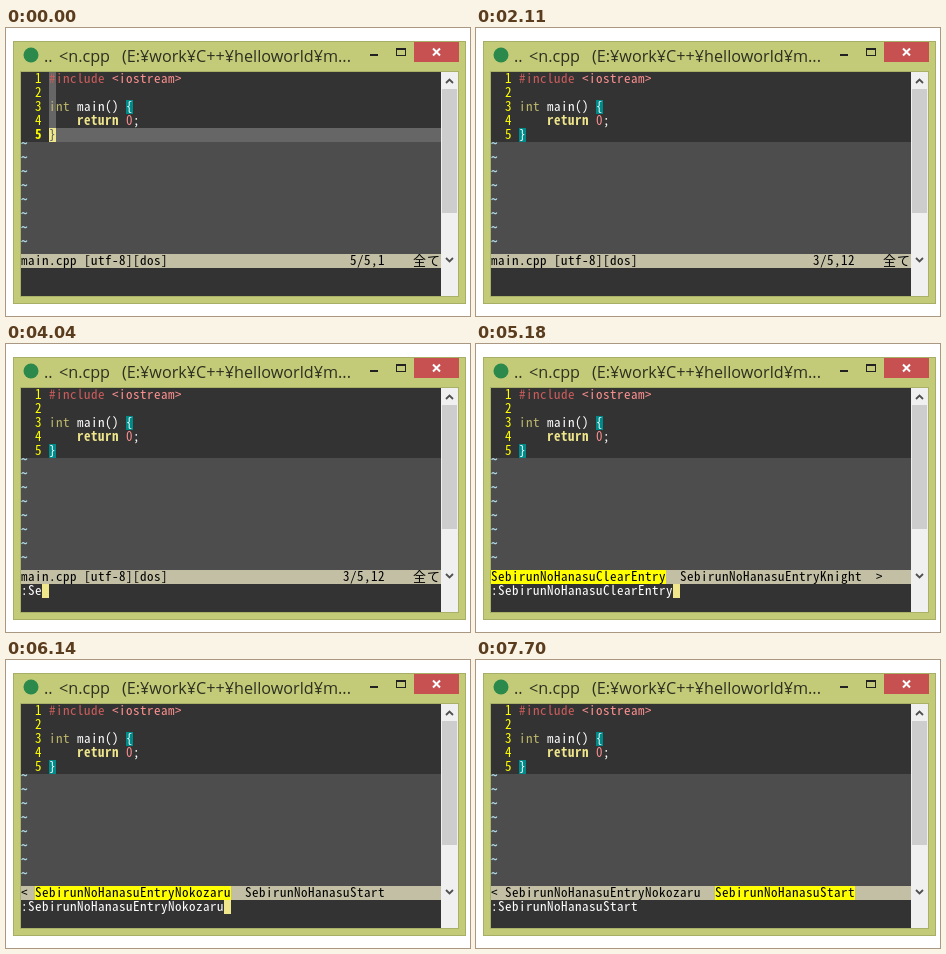
Animation, 464 px wide and 288 px high, one loop 8 s. Source, as an HTML page:

```html
<!DOCTYPE html>
<html lang="ja">
<head>
<meta charset="utf-8">
<title>Editor command completion</title>
<style>
html, body { margin: 0; width: 464px; height: 288px; overflow: hidden; background: #fff; }
svg { display: block; }
.term text {
  font: 13px "Noto Sans Mono CJK JP", "Noto Sans Mono CJK", "Noto Sans CJK JP", "Noto Sans CJK", "Liberation Mono", monospace;
  white-space: pre;
}
.term .bold { font-weight: 700; }
.title text { font: 16.2px "Open Sans", "Noto Sans", sans-serif; fill: #2e3020; white-space: pre; }
</style>
</head>
<body>
<svg width="464" height="288" viewBox="0 0 464 288">
  <g shape-rendering="crispEdges">
    <rect x="7" y="13" width="453" height="263" fill="#a7ae66"/>
    <rect x="8" y="14" width="451" height="261" fill="#c3cb79"/>
    <rect x="14" y="43" width="439" height="226" fill="#a9b168"/>
    <rect x="15" y="44" width="437" height="224" fill="#f0f0f0"/>
    <rect x="436" y="61" width="15" height="124" fill="#cdcdcd"/>
    <rect x="408" y="14" width="45" height="20" fill="#c75050"/>
    <rect x="364" y="26" width="8" height="2" fill="#222"/>
    <path d="M390 20h10v8h-10zM391 22v5h8v-5z" fill="#222" fill-rule="evenodd"/>
  </g>
  <path d="M427 20.5l7 7m0-7l-7 7" stroke="#fff" stroke-width="2"/>
  <path d="M440 55l3.5-3.5 3.5 3.5M440 230l3.5 3.5 3.5-3.5" fill="none" stroke="#505050" stroke-width="1.8"/>
  <circle cx="25" cy="27" r="7.5" fill="#2b8a4b"/>
  <g class="title">
    <text x="38" y="34">..</text>
    <text x="53" y="34">&lt;n.cpp</text>
    <text x="116" y="34">(E:¥work¥C++¥helloworld¥m...</text>
  </g>
  <g class="term">
    <g shape-rendering="crispEdges">
      <rect x="15" y="44" width="420" height="224" fill="#333"/>
      <rect x="15" y="114" width="420" height="112" fill="#4d4d4d"/>
      <rect x="15" y="226" width="420" height="14" fill="#c2bfa5"/>
    </g>
    <g id="under"></g>
    <g id="code"></g>
    <g id="over"></g>
  </g>
</svg>
<script>
const LOOP = 8000, CW = 7, LH = 14, LEFT = 15, TOP = 44, BASELINE = 11;
const STATUS = 13, CMD = 14, LAST = 15;
const WHITE = '#fff', YELLOW = '#ff0', KHAKI = '#f0e68c', PINK = '#ff9090', TEAL = '#008b8b', LINE = '#666';

const base = 'SebirunNoHanasu';
const items = ['ClearEntry', 'EntryKnight', 'EntryNokozaru', 'Start'].map(s => base + s);

const jump = 1390, colonShown = 2680, cmdStart = 3640;
const blinks = [400, 680, 1080, jump, 2110, 2420, 3360, cmdStart, 6760, 7020, 7700];
const keys = [cmdStart, 3760, 4040, 4350, 4350, 4500, 4500, 4900];
const picks = [5180, 5740, 6140, 7020];

const [under, code, over] = ['under', 'code', 'over'].map(id => document.getElementById(id));
const passed = (times, t) => times.filter(x => x <= t).length;

function add(parent, tag, attrs) {
  const el = document.createElementNS('http://www.w3.org/2000/svg', tag);
  for (const k in attrs) el.setAttribute(k, attrs[k]);
  return parent.appendChild(el);
}

function box(parent, row, col, cols, fill, rows = 1) {
  add(parent, 'rect', {
    x: LEFT + col * CW, y: TOP + row * LH, width: cols * CW, height: rows * LH,
    fill, 'shape-rendering': 'crispEdges'
  });
}

// Each character sits on its own terminal cell.
function put(parent, row, col, str, fill, { bold = false, step = 1, dy = 0 } = {}) {
  const x = [...str].map((_, i) => LEFT + (col + i * step) * CW).join(' ');
  add(parent, 'text', {
    x, y: TOP + row * LH + BASELINE + dy, fill, class: bold ? 'bold' : ''
  }).textContent = str;
}

function drawCode() {
  for (let n = 0; n < 4; n++) put(code, n, 2, String(n + 1), YELLOW);
  put(code, 0, 4, '#include', '#cd5c5c');
  put(code, 0, 13, '<iostream>', PINK);
  put(code, 2, 4, 'int', '#bdb76b');
  put(code, 2, 8, 'main() {', WHITE);
  put(code, 3, 8, 'return', KHAKI, { bold: true });
  put(code, 3, 15, '0', PINK);
  put(code, 3, 16, ';', WHITE);
  put(code, 4, 4, '}', WHITE);
  for (let row = 5; row < STATUS; row++) put(code, row, 0, '~', '#add8e6', { bold: true, dy: -5 });
}

function cursor(row, col, ch = '') {
  box(over, row, col, 1, KHAKI);
  if (ch) put(over, row, col, ch, '#4a5560');
}

function drawMenu(pick) {
  const first = pick < 2 ? 0 : 2;
  let col = first ? 2 : 0;
  if (first) put(over, STATUS, 0, '<', '#000');
  for (let i = first; i < first + 2; i++) {
    if (i === pick) box(over, STATUS, col, items[i].length, YELLOW);
    put(over, STATUS, col, items[i], '#000');
    col += items[i].length + 2;
  }
  if (!first) put(over, STATUS, col, '>', '#000');
}

function drawStatus(pos, col) {
  put(over, STATUS, 0, 'main.cpp [utf-8][dos]', '#000');
  put(over, STATUS, col, pos, '#000');
  put(over, STATUS, 56, '全て', '#000', { step: 2 });
}

function draw(t) {
  under.replaceChildren();
  over.replaceChildren();
  const atEnd = t < jump;
  const lit = passed(blinks, t) % 2 === 0;
  const typed = passed(keys, t);
  const pick = passed(picks, t) - 1;

  if (atEnd) {
    box(under, 0, 4, 1, LINE, 5);
    box(under, 4, 4, 56, LINE);
  }
  box(under, 2, 15, 1, TEAL);
  box(under, 4, 4, 1, TEAL);
  put(over, 4, 2, '5', YELLOW, { bold: atEnd });

  if (pick >= 0) drawMenu(pick);
  else if (atEnd) drawStatus('5/5,1', 47);
  else drawStatus('3/5,12', 46);

  if (typed) {
    const cmd = ':' + (pick >= 0 ? items[pick] : base.slice(0, typed - 1));
    put(over, CMD, 0, cmd, WHITE);
    if (lit) cursor(CMD, cmd.length);
  } else {
    if (t >= colonShown) put(over, LAST, 49, ':', WHITE);
    if (lit) atEnd ? cursor(4, 4, '}') : cursor(2, 15, '{');
  }
}

const cues = [0, colonShown, ...blinks, ...keys, ...picks];
const start = performance.now();
let shown = -1;

function tick() {
  const t = (performance.now() - start) % LOOP;
  const cue = Math.max(...cues.filter(c => c <= t));
  if (cue !== shown) draw(shown = cue);
  requestAnimationFrame(tick);
}

drawCode();
tick();
</script>
</body>
</html>
```
